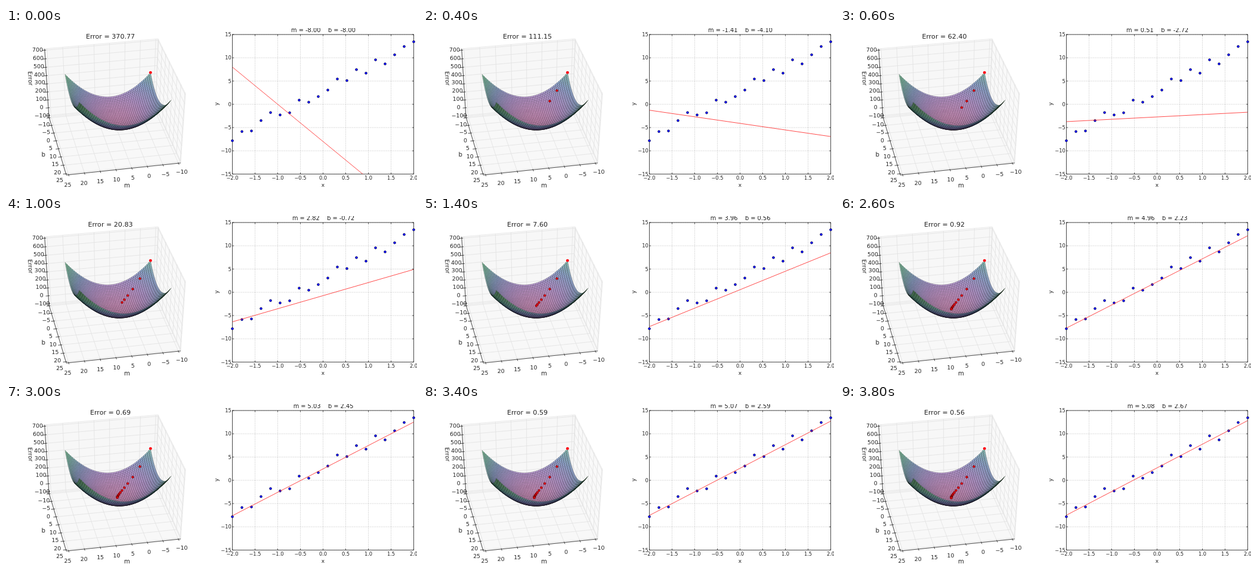
An HTML page for the animation above (4000 ms loop, 689x270 px).

```html
<!DOCTYPE html>
<html lang="en">
<head>
<meta charset="utf-8">
<title>Gradient descent</title>
<style>
  html, body { margin: 0; width: 100%; height: 100%; overflow: hidden; background: #fff; }
  svg { display: block; width: 689px; height: 270px; }
  text { font-family: "DejaVu Sans", Verdana, sans-serif; fill: #222; text-anchor: middle; }
  .grid3 { stroke: #e1e1e1; stroke-width: .8; fill: none; }
  .axis { stroke: #222; stroke-width: .8; fill: none; }
  .grid { stroke: #999; stroke-width: .7; stroke-dasharray: 1 2; }
  .cell { stroke: #000; stroke-opacity: .46; stroke-width: .5; fill-opacity: .72; }
  .fit { stroke: #ff2a2a; stroke-width: .85; }
  .data { fill: #00f; stroke: #000; stroke-width: .5; }
  .start { fill: #ff0010; }
  .step { fill: #e00010; stroke: #500; stroke-width: .5; }
</style>
</head>
<body>
<svg id="stage" viewBox="0 0 689 270">
  <clipPath id="frame"><rect x="379.5" y="11" width="304" height="235.5"/></clipPath>
</svg>
<script>
const stage = document.getElementById('stage');
const STEP_MS = 200, STEPS = 20;

function add(tag, attrs, text) {
  const el = document.createElementNS('http://www.w3.org/2000/svg', tag);
  for (const key in attrs) el.setAttribute(key, attrs[key]);
  if (text !== undefined) el.textContent = text;
  stage.appendChild(el);
  return el;
}
const line = (cls, [x1, y1], [x2, y2]) => add('line', { class: cls, x1, y1, x2, y2 });
const dot = (cls, [cx, cy], r) => add('circle', { class: cls, cx, cy, r });
const poly = (pts, attrs) => add('polygon', { points: pts.map(p => p.map(n => n.toFixed(2))).join(' '), ...attrs });
const minus = v => String(v).replace('-', '\u2212');

// Text centred vertically on y.
function label(text, x, y, size, turn = 0, anchor = 'middle') {
  return add('text', {
    transform: `translate(${x} ${y}) rotate(${turn})`, y: size * .36,
    'font-size': size, style: `text-anchor:${anchor}`
  }, text);
}

// Least squares model and its descent from (-8, -8)
const BEST_M = 5.1019, BEST_B = 2.829, XX = 4 / 3 * 21 / 19, RATE = .2;
const error = (m, b) => XX * (m - BEST_M) ** 2 + (b - BEST_B) ** 2 + .533;
const descend = (best, rate, k) => best - (8 + best) * rate ** k;
const path = Array.from({ length: STEPS }, (_, k) => {
  const m = descend(BEST_M, 1 - RATE * XX, k), b = descend(BEST_B, 1 - RATE, k);
  return { m, b, e: error(m, b) };
});

// Perspective camera around a unit cube
const rad = Math.PI / 180;
const sa = Math.sin(79 * rad), ca = Math.cos(79 * rad);
const se = Math.sin(40 * rad), ce = Math.cos(40 * rad);
const nearness = (u, v, w) => ce * ca * u + ce * sa * v + se * w;
function project(u, v, w) {
  const d = 10 - nearness(u, v, w);
  return [179 + 1868 * (ca * v - sa * u) / d,
          131.6 - 1452 * (ce * w - se * ca * u - se * sa * v) / d];
}
const unit = v => (v + 10) / 35 - .5;
const unitE = e => (e + 100) / 800 - .5;
const place = (m, b, e) => project(unit(m), unit(b), unitE(e));

function drawBox() {
  const h = .5 + 1 / 48, size = 9.4;
  const pane = (fill, ...corners) =>
    poly(corners.map(c => project(...c.map(s => s * h))), { fill, stroke: '#e6e6e6', 'stroke-width': .8 });
  pane('#f9f9f9', [-1, -1, -1], [-1, 1, -1], [-1, 1, 1], [-1, -1, 1]);
  pane('#f7f7f7', [1, -1, -1], [-1, -1, -1], [-1, -1, 1], [1, -1, 1]);
  pane('#f8f8f8', [1, -1, -1], [1, 1, -1], [-1, 1, -1], [-1, -1, -1]);

  const bend = (...pts) => add('polyline', { class: 'grid3', points: pts.map(p => project(...p)).join(' ') });
  for (let i = 0; i < 8; i++) {
    const t = .5 - i / 7;
    bend([t, h, -h], [t, -h, -h], [t, -h, h]);
    bend([h, t, -h], [-h, t, -h], [-h, t, h]);
  }
  for (let i = 0; i < 9; i++) {
    const t = .5 - i / 8;
    bend([h, -h, t], [-h, -h, t], [-h, h, t]);
  }

  const edge = (a, b) => line('axis', project(...a), project(...b));
  edge([h, h, -h], [-h, h, -h]);
  edge([h, -h, -h], [h, h, -h]);
  edge([h, -h, -h], [h, -h, h]);
  const inner = h - .012, outer = h + .025;
  for (let i = 0; i < 8; i++) {
    const t = .5 - i / 7;
    edge([t, inner, -h], [t, outer, -h]);
    edge([inner, t, -h], [outer, t, -h]);
    label(minus(25 - 5 * i), 103.5 + 27.3 * i, 264.8 - 3.1 * i, size);
    label(minus(-10 + 5 * i), 63.5 + 3.8 * i, 162.5 + 13.5 * i, size);
  }
  for (let i = 0; i < 9; i++) {
    const t = .5 - i / 8;
    edge([inner, -h, t], [outer, -h, t]);
    label(minus(700 - 100 * i), 53 + .95 * i, 36.5 + 13.9 * i, size);
  }
  label('m', 203, 265, 10.2);
  label('b', 62.7, 213, 10.2);
  label('Error', 41, 85, 9.8, 86);
}

const ramp = [[230, 132, 200], [176, 132, 214], [118, 146, 206], [98, 182, 156], [88, 166, 98], [60, 116, 52]];
function tint(t) {
  const s = Math.min(t, .999) * (ramp.length - 1), i = Math.floor(s);
  return `rgb(${ramp[i].map((c, j) => Math.round(c + (ramp[i + 1][j] - c) * (s - i)))})`;
}

function drawSurface() {
  const N = 50, at = i => -8 + 28 * i / N, cells = [];
  for (let i = 0; i < N; i++) for (let j = 0; j < N; j++) {
    const m = at(i + .5), b = at(j + .5), e = error(m, b);
    cells.push({ i, j, e, near: nearness(unit(m), unit(b), unitE(e)) });
  }
  cells.sort((a, b) => a.near - b.near);
  for (const { i, j, e } of cells) {
    const corners = [[i, j], [i + 1, j], [i + 1, j + 1], [i, j + 1]].map(([p, q]) =>
      place(at(p), at(q), error(at(p), at(q))));
    poly(corners, { class: 'cell', fill: tint(e / 622) });
  }
}

const plot = (x, y) => [531.5 + 76 * x, 128.75 - 7.85 * y];
const ys = [-7.82, -5.85, -5.72, -3.49, -1.77, -2.28, -1.83, .9, .46, 1.67,
            3.07, 5.43, 5.11, 7.46, 6.7, 9.57, 8.68, 10.65, 12.43, 13.45];

function drawPlot() {
  for (let x = -2; x <= 2; x += .5) {
    const [px, low] = plot(x, -15), top = plot(x, 15)[1];
    line('grid', [px, low], [px, top]);
    line('axis', [px, low], [px, low - 2.5]);
    line('axis', [px, top], [px, top + 2.5]);
    label(minus(x.toFixed(1)), px, 253.4, 8.3);
  }
  for (let y = -15; y <= 15; y += 5) {
    const [left, py] = plot(-2, y), right = plot(2, y)[0];
    line('grid', [left, py], [right, py]);
    line('axis', [left, py], [left + 2.5, py]);
    line('axis', [right, py], [right - 2.5, py]);
    label(minus(y), 377.8, py, 8.3, 0, 'end');
  }
  add('rect', { class: 'axis', x: 379.5, y: 11, width: 304, height: 235.5 });
  label('x', 531.5, 264.5, 9);
  label('y', 353, 128, 9, -90);
  ys.forEach((y, i) => dot('data', plot(-2 + 4 * i / 19, y), 2));
}

drawBox();
drawSurface();
const trail = path.map((p, k) => dot(k ? 'step' : 'start', place(p.m, p.b, p.e), k ? 1.9 : 2.4));
drawPlot();
const fit = add('line', { class: 'fit', 'clip-path': 'url(#frame)' });
const errorTitle = label('', 175, 13.5, 11.1);
const fitTitle = label('', 532, 3.7, 9.8);

function show(k) {
  const { m, b, e } = path[k];
  trail.forEach((c, i) => c.setAttribute('visibility', i <= k ? 'visible' : 'hidden'));
  const [x1, y1] = plot(-2, b - 2 * m), [x2, y2] = plot(2, b + 2 * m);
  Object.entries({ x1, y1, x2, y2 }).forEach(([key, v]) => fit.setAttribute(key, v));
  errorTitle.textContent = `Error = ${e.toFixed(2)}`;
  fitTitle.textContent = `m = ${m.toFixed(2)}${'\u00a0'.repeat(4)}b = ${b.toFixed(2)}`;
}

let shown = -1;
const start = performance.now();
function tick() {
  const k = Math.floor((performance.now() - start) / STEP_MS) % STEPS;
  if (k !== shown) show(shown = k);
  requestAnimationFrame(tick);
}
tick();
</script>
</body>
</html>
```
